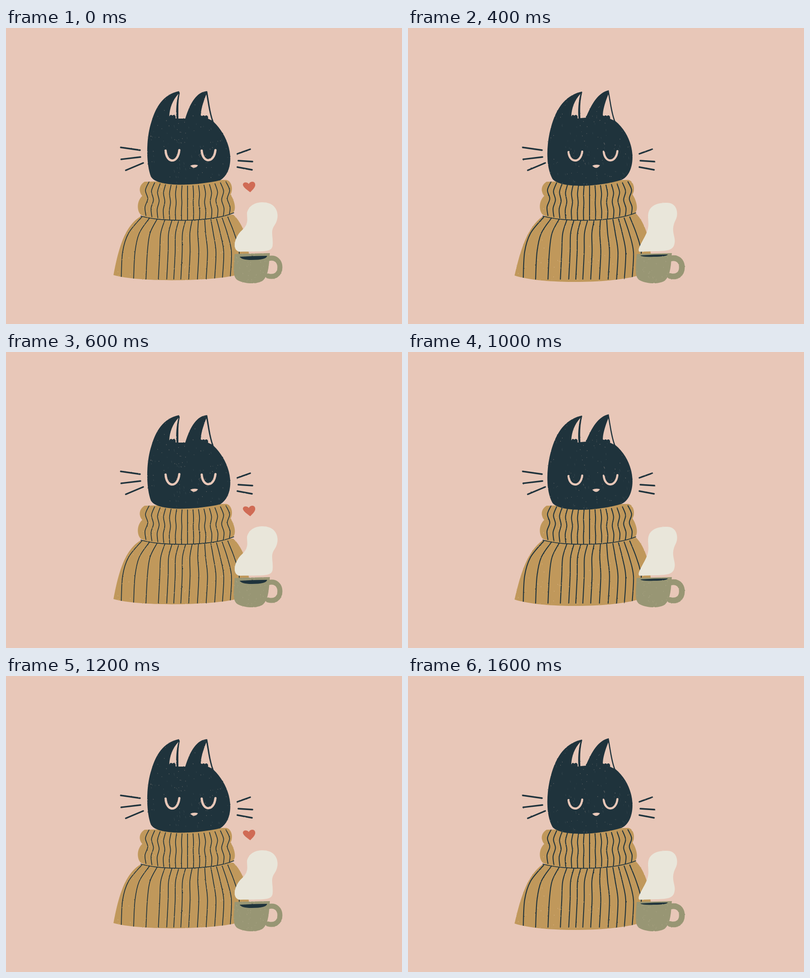
An HTML page for the animation above (1.8 s loop, 866 by 647 pixels).

```html
<!DOCTYPE html>
<html lang="en">
<head>
<meta charset="utf-8">
<title>Cat in a sweater</title>
<style>
  html, body { margin: 0; width: 100%; height: 100%; overflow: hidden; background: #e8c7b8; }
  svg { display: block; width: 866px; height: 647px; }
  path { stroke-linecap: round; stroke-linejoin: round; }
</style>
</head>
<body>
<svg id="stage" viewBox="0 0 866 647"></svg>
<script>
const INK = '#1f333c', PINK = '#e8c7b8', WOOL = '#c0985b', MUG = '#989674',
      CREAM = '#e9e6da', RED = '#d06b55';
const POSES = 3, STEP = 200;

const mix = (a, b, k) => a + (b - a) * k;

// In-between of two paths that share the same commands.
function morph(a, b, k) {
  const end = b.match(/[\d.]+/g);
  let i = 0;
  return a.replace(/[\d.]+/g, v => mix(+v, +end[i++], k).toFixed(1));
}

// Value at u (0 to 1) along evenly spaced keys.
function along(keys, u) {
  const x = u * (keys.length - 1), i = Math.min(Math.floor(x), keys.length - 2);
  return mix(keys[i], keys[i + 1], x - i);
}

function smooth(pts) {
  const at = i => pts[Math.max(0, Math.min(pts.length - 1, i))];
  let d = 'M' + pts[0];
  for (let i = 0; i < pts.length - 1; i++) {
    const [p, q, r, s] = [at(i - 1), at(i), at(i + 1), at(i + 2)];
    d += `C${q.map((v, j) => v + (r[j] - p[j]) / 6)} ${r.map((v, j) => v - (s[j] - q[j]) / 6)} ${r}`;
  }
  return d;
}

function random(seed) {
  return () => (seed = seed * 16807 % 2147483647) / 2147483647;
}

const head = k => morph(
  `M378,138C343,146 328,172 318,205C305,245 307,300 317,325C332,350 420,344 468,333
   C500,315 500,250 454,205C446,183 444,158 440,138C418,139 403,162 392,198L377,198C377,180 376,160 380,142Z`,
  `M380,139C345,147 330,172 320,195C302,240 299,300 316,330C335,352 420,347 467,332
   C500,318 502,243 453,203C446,183 443,158 439,136C416,141 402,165 389,196L377,197C376,180 376,160 381,140Z`, k);

const body = k => morph(
  'M296,411C261,430 246,480 235,540C290,556 440,554 500,541L529,537C538,490 524,432 497,408Z',
  'M295,411C262,435 247,480 233,541C290,560 440,559 500,542L529,538C537,490 524,430 498,405Z', k);

const steam = k => morph(
  `M561,381C595,381 600,412 588,430C577,445 585,455 583,476C581,491 560,488 510,489
   C494,485 499,460 513,445C532,428 527,420 527,404C531,388 545,381 561,381Z`,
  `M565,382C590,381 592,408 585,420C573,445 586,455 583,470C580,491 560,487 506,489
   C502,486 506,478 513,465C530,436 525,430 525,410C526,388 545,382 565,382Z`, k);

const coffee = k => morph(
  'M511,500Q540,498 571,498Q570,507 537,507Q515,507 511,500Z',
  'M508,497Q538,495 568,495Q566,500 537,500Q512,501 508,497Z', k);

const COLLAR = `M303,336C289,345 291,359 298,367C284,380 287,403 296,409C340,425 450,424 497,404
  C505,394 498,374 491,364C498,352 493,333 481,332Z`;
const SEAM = 'M295,411C340,425 450,424 498,404';
const CUP = 'M500,494C498,530 495,545 508,552C525,560 550,560 562,552C575,540 575,515 577,492Z';
const HANDLE = 'M574,504C590,500 599,510 599,523C599,538 588,546 573,542';
const HEART = `M531,341C534,334 546,334 545,344C544,350 538,355 534,359
  C528,354 520,350 518,343C518,336 528,336 531,341Z`;
const EARS = `M377,144C364,158 358,175 357,193L373,198C371,180 373,160 377,144Z
  M438,145C430,165 426,180 426,191L450,202C443,180 441,160 438,145Z`;
const NOSE = 'M403,301Q411,297 420,300Q412,311 403,301Z';
const WHISKERS = `M251,261L293,267M252,287L294,282M262,311L300,295
  M506,275L534,265M508,290L539,292M506,304L538,310`;

const eye = (x, y, depth) => `M${x - 15} ${y}c2 ${depth} 27 ${depth} 30 -1`;

function collarRibs() {
  const count = 15, zigzag = [-4, 4, -1, 5, 3];
  let d = '';
  for (let i = 0; i < count; i++) {
    const side = i / (count - 1) * 2 - 1, x = 397 + 88 * side;
    const top = 345 - 9 * side * side, end = 420 - 10 * side * side;
    d += smooth(zigzag.map((z, n) => [x + z * side, mix(top, end, n / (zigzag.length - 1))]));
  }
  return d;
}

function bodyRibs() {
  const count = 14;
  let d = '';
  for (let i = 0; i < count; i++) {
    const u = i / (count - 1);
    const top = along([297, 352, 400, 445, 485], u), low = along([252, 340, 390, 452, 507], u);
    d += smooth([[top, 421 - 32 * (u - .5) ** 2], [mix(top, low, .65), 449], [low + 3, 490], [low, 549]]);
  }
  return d;
}

function specks(rnd, count, [x, y, w, h], length) {
  let d = '';
  for (let i = 0; i < count; i++) {
    const len = length * rnd();
    d += `M${x + w * rnd()} ${y + h * rnd()}l${len * .15} ${len}`;
  }
  return d;
}

const fill = (d, color) => `<path d="${d}" fill="${color}"/>`;
const stroke = (d, color, width, opacity = 1) =>
  `<path d="${d}" fill="none" stroke="${color}" stroke-width="${width}" opacity="${opacity}"/>`;
const tuft = (x, y) => [-3, 3].map(dx => `<ellipse cx="${x + dx}" cy="${y}" rx="4" ry="5" fill="${INK}"/>`).join('');

function drawPose(i) {
  const k = i / (POSES - 1), rnd = random(71 + i * 523), ribWidth = mix(1.7, 2.1, k);
  const eyes = eye(mix(364, 366, k), mix(268, 271, k), mix(29, 25, k)) +
               eye(443, mix(268, 270, k), mix(28, 26, k));

  // A filled shape with its own clipped details on top.
  const patch = (name, d, color, details) =>
    `<clipPath id="${name}${i}"><path d="${d}"/></clipPath>${fill(d, color)}
     <g clip-path="url(#${name}${i})">${details}</g>`;

  return `<filter id="rough${i}" filterUnits="userSpaceOnUse" x="0" y="0" width="866" height="647"
      color-interpolation-filters="sRGB">
      <feTurbulence type="fractalNoise" baseFrequency=".25" numOctaves="2" seed="${i + 3}"/>
      <feDisplacementMap in="SourceGraphic" scale="1.8" xChannelSelector="R" yChannelSelector="G"/>
    </filter>
    <g class="pose" filter="url(#rough${i})">
      ${patch('body', body(k), WOOL, stroke(bodyRibs(), INK, ribWidth) +
        stroke(specks(rnd, 50, [235, 410, 290, 145], 2), '#dcb68b', 1, .8))}
      ${patch('collar', COLLAR, WOOL, stroke(collarRibs(), INK, ribWidth) +
        stroke(specks(rnd, 25, [290, 335, 210, 85], 2), '#dcb68b', 1, .8))}
      ${stroke(SEAM, INK, 1.7)}
      ${patch('head', head(k), INK,
        stroke(specks(rnd, 90, [305, 140, 187, 205], 1), PINK, .9, .5) +
        stroke(specks(rnd, 60, [305, 190, 187, 155], 5), '#6f7b7c', .7, .35))}
      ${fill(EARS, PINK)}
      ${tuft(364, 195)}${tuft(435, 196)}
      ${stroke(eyes, PINK, mix(5, 4.6, k))}
      ${fill(NOSE, PINK)}
      ${stroke(WHISKERS, INK, 3.4)}
      ${fill(steam(k), CREAM)}
      ${stroke(HANDLE, MUG, mix(11, 12.5, k))}
      ${patch('cup', CUP, MUG, stroke(specks(rnd, 40, [498, 492, 80, 66], 2), '#b3ab8c', .9, .7))}
      ${fill(coffee(k), INK)}
      ${i < POSES - 1 ? fill(HEART, RED) : ''}
    </g>`;
}

const order = [...Array(POSES).keys()];
const stage = document.getElementById('stage');
stage.innerHTML = `<rect width="866" height="647" fill="${PINK}"/>` + order.map(drawPose).join('');

stage.querySelectorAll('.pose').forEach((pose, i) => {
  const frames = [...order, POSES].map(n => ({
    offset: n / POSES,
    visibility: n === i ? 'visible' : 'hidden',
    easing: 'steps(1, end)'
  }));
  pose.animate(frames, { duration: POSES * STEP, iterations: Infinity });
});
</script>
</body>
</html>
```
